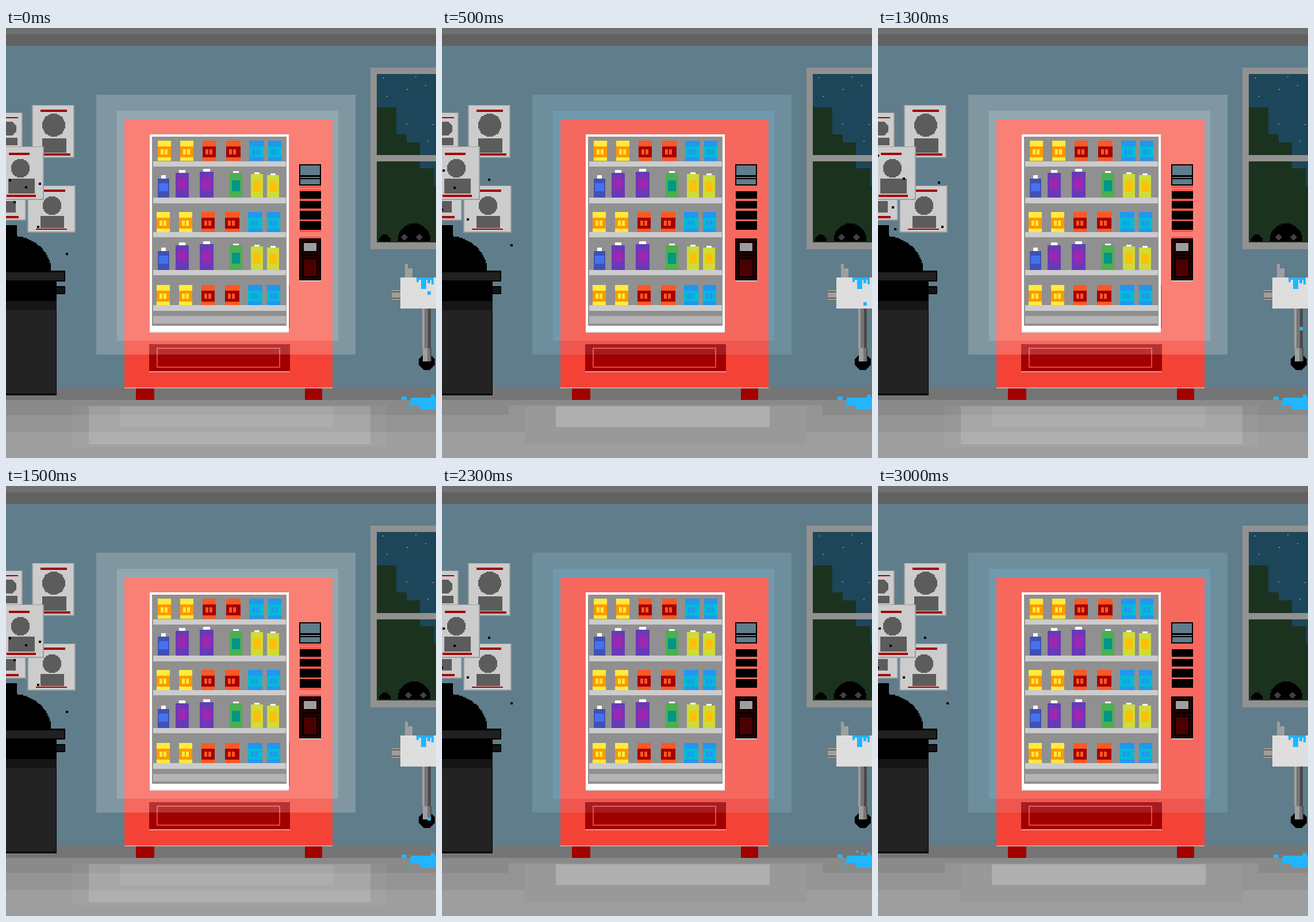
Recreate the animation shown at these times as an HTML page with a canvas. Size 748 by 748 pixels, loop 3500 ms.

```html
<!DOCTYPE html>
<html lang="en">
<head>
<meta charset="utf-8">
<title>Vending machine at night</title>
<style>
html, body { margin: 0; width: 100%; height: 100%; overflow: hidden; background: #607d8b; }
canvas { display: block; width: 748px; height: 748px; }
</style>
</head>
<body>
<canvas id="stage" width="748" height="748"></canvas>
<script>
const ctx = document.getElementById('stage').getContext('2d');
const STEP = 500;

// One entry per step: glow, fly pose, eye offset, falling drop, splash
const STEPS = [
  { white: true, flies: 0, eye: 693, drop: 458 },
  { white: false, flies: 1, eye: 695, drop: 477 },
  { white: true, flies: 2, eye: 697, drop: 520 },
  { white: true, flies: 0, eye: 700, drop: 576 },
  { white: false, flies: 1, eye: 698, splash: true },
  { white: true, flies: 2, eye: 697 },
  { white: false, flies: 1, eye: 695 }
];

const FLIES = [
  [[5, 263], [33, 275], [57, 269], [13, 301], [54, 344], [104, 391]],
  [[1, 246], [20, 276], [80, 262], [-2, 314], [43, 331], [119, 376]],
  [[-2, 220], [43, 260], [104, 267], [24, 310], [28, 348], [110, 344]]
];

// Corner to corner box
function box(color, x1, y1, x2, y2) {
  ctx.fillStyle = color;
  ctx.fillRect(x1, y1, x2 - x1, y2 - y1);
}

// Stair-stepped ellipse, optionally cut off at a floor line
function disc(color, cx, cy, rx, ry = rx, floor = 748) {
  for (let y = -ry; y < ry; y += 2) {
    const top = cy + y;
    if (top >= floor) break;
    const half = Math.round(rx * Math.sqrt(Math.max(0, 1 - ((y + 1) / ry) ** 2)) / 2) * 2;
    box(color, cx - half, top, cx + half, Math.min(top + 2, floor));
  }
}

function room(white) {
  box('#607d8b', 0, 0, 748, 748);
  box('#707070', 0, 0, 748, 11);
  box('#616161', 0, 11, 748, 31);
  box('#757575', 0, 625, 748, 647);
  box('#8a8a8a', 0, 647, 748, 673);
  box('#949494', 0, 673, 748, 703);
  box('#9e9e9e', 0, 703, 748, 748);
  if (white) {
    box('rgba(255,255,255,.04)', 116, 656, 662, 729);
    box('rgba(255,255,255,.14)', 144, 658, 634, 724);
    box('rgba(255,255,255,.07)', 198, 658, 570, 694);
  } else {
    box('#949494', 116, 656, 662, 673);
    box('#999999', 144, 658, 634, 724);
    box('#afafaf', 198, 658, 570, 694);
  }
  box(white ? '#8097a2' : '#6c8e9d', 157, 116, 608, 568);
  box(white ? '#93a7b0' : '#7199ae', 193, 144, 578, 544);
}

function poster(x1, y1, x2, y2) {
  box('#9e9e9e', x1 - 1, y1 - 1, x2 + 1, y2 + 2);
  box('#cccccc', x1 + 1, y1, x2 - 1, y2);
}

function posters() {
  const red = '#a30000', ink = '#5c5c5c';
  poster(-4, 148, 28, 206);
  box(red, 0, 155, 21, 157);
  disc(ink, 6, 175, 13, 12);
  box(ink, 0, 191, 20, 204);

  poster(-4, 297, 34, 333);
  box(ink, 0, 301, 17, 321);
  box(red, 0, 327, 22, 331);

  poster(38, 275, 120, 354);
  box(red, 65, 281, 103, 285);
  disc(ink, 80, 309, 16);
  box(ink, 60, 327, 101, 348);
  box(red, 52, 349, 106, 351);

  poster(46, 135, 118, 224);
  box(red, 60, 142, 106, 146);
  disc(ink, 83, 169, 20);
  box(ink, 63, 192, 105, 217);
  box(red, 52, 218, 112, 222);

  poster(-4, 207, 65, 297);
  box(red, 5, 217, 41, 221);
  disc(ink, 25, 244, 16);
  box(ink, 4, 262, 50, 288);
  box(red, 1, 290, 52, 294);
}

function bin() {
  box('#000', 0, 343, 19, 361);
  disc('#000', 8, 423, 71, 62, 423);
  box('#000', 0, 422, 103, 441);
  box('#212121', 0, 425, 101, 439);
  box('#000', 0, 441, 88, 639);
  box('#000', 88, 449, 103, 463);
  box('#141414', 88, 451, 101, 461);
  box('#161616', 0, 475, 88, 491);
  box('#232323', 0, 491, 87, 636);
}

function can(x, y, w, base, label) {
  box(base, x, y, x + w, y + 35);
  box(label, x, y + 10, x + w, y + 29);
  box(base, x + 5, y + 15, x + 10, y + 24);
  box(base, x + 12, y + 15, x + 17, y + 24);
}

function cans(x, y) {
  const yellow = ['#ffeb3b', '#ff9800'], red = ['#ff5722', '#a30000'], blue = ['#2196f3', '#00bcd4'];
  can(x, y, 23, ...yellow);
  can(x + 39, y, 23, ...yellow);
  can(x + 78, y, 23, ...red);
  can(x + 119, y, 25, ...red);
  can(x + 159, y, 25, ...blue);
  can(x + 192, y, 23, ...blue);
}

// Heights are measured up from the shelf
function bottle(x, w, foot, tall, cap, base, label, lt, lb) {
  box('#fff', x + 6, foot - tall - cap, x + w - 6, foot - tall);
  box(base, x, foot - tall, x + w, foot);
  box(label, x + 4, foot - lt, x + w - 4, foot - lb);
}

function bottles(foot) {
  bottle(264, 20, foot, 33, 6, '#3f51b5', '#4472ee', 25, 11);
  box('#4472ee', 266, foot - 25, 282, foot - 11);
  bottle(295, 23, foot, 43, 5, '#673ab7', '#9c27b0', 34, 14);
  bottle(337, 24, foot, 45, 5, '#673ab7', '#9c27b0', 34, 13);
  bottle(389, 22, foot, 43, 3, '#4caf50', '#009688', 30, 11);
  bottle(426, 21, foot, 41, 3, '#cddc39', '#ffc107', 30, 11);
  bottle(454, 21, foot, 39, 3, '#cddc39', '#ffc107', 29, 11);
}

function panel(white) {
  if (white) {
    box('#f6564a', 511, 275, 548, 278);
    box('#f6564a', 511, 280, 548, 355);
    box('#f6564a', 511, 363, 548, 366);
  }
  box('#000', 510, 237, 548, 274);
  box('#607d8b', 512, 239, 546, 272);
  box('#000', 512, 256, 546, 259);
  box('#000', 512, 261, 546, 263);
  box('#000', 511, 284, 548, 297);
  box('#000', 511, 301, 548, 314);
  box('#000', 511, 318, 548, 333);
  box('#000', 511, 336, 548, 351);
  box('#cccccc', 511, 439, 548, 441);
  box('#000', 510, 366, 548, 439);
  box('#240000', 512, 368, 546, 437);
  box('#000', 516, 372, 542, 390);
  box('#9e9e9e', 518, 374, 540, 388);
  box('#000', 512, 394, 546, 396);
  box('#000', 516, 400, 542, 434);
  box('#4a0000', 518, 402, 540, 432);
}

function machine(white) {
  box('#a30000', 226, 627, 258, 647);
  box('#a30000', 520, 627, 550, 647);
  box('#f44336', 206, 159, 568, 625);
  box('#c4a5a3', 206, 625, 568, 627);
  box('#a00000', 249, 550, 494, 597);
  box('#cfa09c', 249, 597, 494, 599);
  ctx.strokeStyle = '#f44336';
  ctx.lineWidth = 2;
  ctx.strokeRect(263, 557, 213, 33);
  box(white ? 'rgba(255,255,255,.2)' : 'rgba(190,225,255,.13)', 206, 544, 568, 568);
  box(white ? '#fa8076' : '#f6685e', 206, 159, 568, 544);

  if (white) box('#f6564a', 491, 447, 494, 521);
  box('#fff', 250, 185, 492, 530);
  box('#dddddd', 250, 528, 492, 530);
  box('#909090', 254, 189, 488, 518);
  for (const [top, end] of [[232, 241], [295, 305], [355, 364], [421, 430], [482, 492]])
    box('#cccccc', 256, top, 487, end);
  box('#b4b4b4', 256, 501, 487, 514);
  cans(264, 196);
  bottles(295);
  cans(262, 320);
  bottles(421);
  cans(262, 447);
  panel(white);
}

function windowView(eye) {
  const tree = '#1b331e', sky = '#1d465a';
  box('#919191', 634, 69, 748, 385);
  box(sky, 645, 80, 748, 221);
  box(sky, 645, 232, 748, 373);
  box(tree, 645, 138, 679, 221);
  box(tree, 679, 185, 697, 221);
  box(tree, 697, 199, 720, 221);
  box(tree, 645, 232, 720, 373);
  box(tree, 720, 244, 745, 373);
  box(tree, 745, 275, 748, 373);
  for (const [x, y] of [[655, 86], [662, 118], [697, 106], [712, 84], [729, 99], [696, 166], [733, 196], [742, 167]])
    box('#7d8a82', x, y, x + 2, y + 2);
  disc('#000', 659, 370, 10, 11, 371);
  disc('#000', 710, 370, 29, 30, 371);
  disc('#424242', eye, 364, 5, 5);
  disc('#424242', eye + 26, 364, 5, 5);
}

function sink(drop, splash) {
  const water = '#21b6ff';
  box('#9e9e9e', 694, 418, 707, 434);
  box('#9e9e9e', 694, 410, 699, 418);
  box('#8cb4c6', 704, 419, 706, 423);
  box('#757575', 669, 454, 686, 475);
  box('#9e9e9e', 671, 456, 686, 473);
  box('#616161', 671, 458, 686, 460);
  box('#616161', 671, 469, 686, 471);
  disc('#000', 732, 581, 14);
  box('#9e9e9e', 724, 488, 728, 557);
  box('#757575', 728, 488, 734, 557);
  box('#4a4a4a', 734, 488, 739, 557);
  box('#9e9e9e', 725, 557, 733, 580);
  box('#757575', 733, 557, 740, 580);
  box('#4a4a4a', 738, 557, 740, 580);
  box('#dedede', 686, 434, 748, 488);

  box(water, 714, 434, 744, 438);
  box(water, 714, 438, 718, 442);
  box(water, 722, 438, 731, 454);
  box(water, 733, 438, 738, 444);
  box(water, 740, 438, 744, 446);
  box(water, 688, 641, 697, 647);
  box(water, 704, 643, 748, 656);
  box(water, 703, 649, 706, 657);
  box(water, 699, 660, 703, 663);
  box(water, 720, 656, 748, 664);
  box(water, 739, 638, 746, 643);
  if (drop) box(water, 733, drop, 739, drop + 6);
  if (splash) {
    box(water, 720, 634, 724, 638);
    box(water, 729, 638, 733, 642);
  }
}

function draw(s) {
  room(s.white);
  posters();
  bin();
  machine(s.white);
  windowView(s.eye);
  sink(s.drop, s.splash);
  for (const [x, y] of FLIES[s.flies]) box('#000', x, y, x + 4, y + 4);
}

const start = performance.now();
let shown = -1;
function tick() {
  const step = Math.floor((performance.now() - start) / STEP) % STEPS.length;
  if (step !== shown) draw(STEPS[shown = step]);
  requestAnimationFrame(tick);
}
tick();
</script>
</body>
</html>
```
